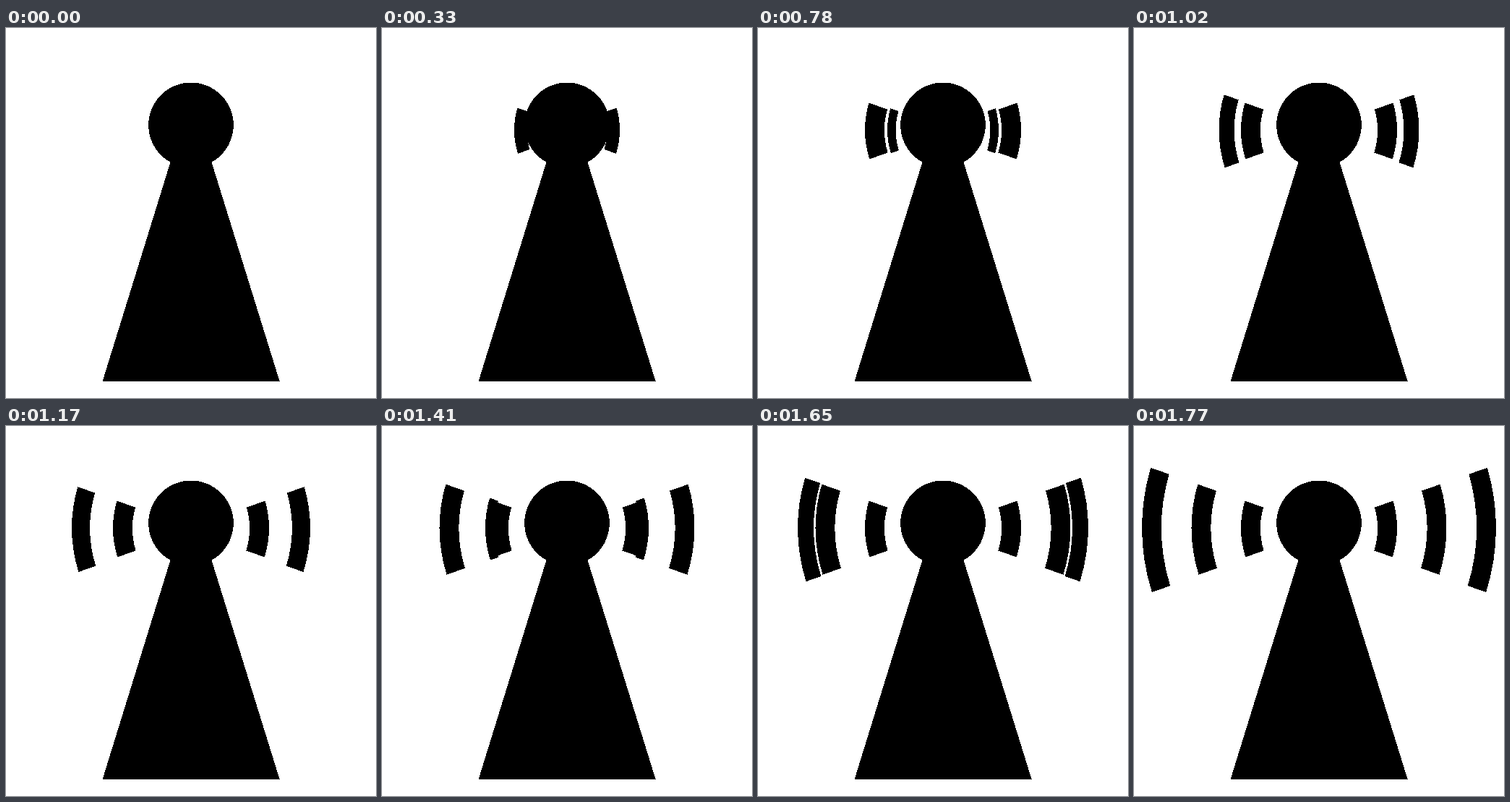
Recreate the animation shown at these times as an HTML page. Size 512 by 512 pixels, loop 2100 ms.

```html
<!DOCTYPE html>
<html lang="en">
<head>
<meta charset="utf-8">
<title>Transmitter</title>
<style>
  html, body { margin: 0; width: 100%; height: 100%; overflow: hidden; background: #fff; }
  svg { display: block; width: 100%; height: 100%; shape-rendering: crispEdges; }
</style>
</head>
<body>
<svg viewBox="0 0 512 512">
  <rect width="512" height="512" fill="#fff"/>
  <path id="left"/>
  <path id="right" transform="matrix(-1 0 0 1 512 0)"/>
  <path d="M228.3 183H283.7L378.7 489H133.5Z"/>
  <circle cx="256" cy="134.3" r="58.8"/>
</svg>
<script>
const LOOP = 2100, STEP = 30;
const FIRST_X = 148, PITCH = 68.5;    // resting place of the bands
const START_HALF = 25, WIDTH = 25.5;  // half height at birth, width at rest
const BULGE = 0.15, SLANT = 0.353, LEAN = 0.01;

const left = document.getElementById('left');
const right = document.getElementById('right');

// Each wave leaves the head from x with a thin band; ease 1 is a full ease-out.
const waves = [
  { start: 180, end: 720, ease: 1, x: 215, width: 8 },
  { start: 720, end: 1260, ease: 0.5, x: 198, width: 8.3 },
  { start: 1260, end: 1770, ease: 0, x: 198, width: 6 }
];

const mix = (a, b, p) => a + (b - a) * p;

// Upright curve from the top corner to the bottom one, or back with dir -1.
function side(x, y, half, dir) {
  const lean = dir * LEAN * half;
  return `${x - lean} ${y - dir * half}` +
    `Q${x - 2 * BULGE * half} ${y} ${x + lean} ${y + dir * half}`;
}

function band(wave, i, time) {
  if (time <= wave.start) return '';
  const t = Math.min(1, (time - wave.start) / (wave.end - wave.start));
  const p = t + wave.ease * t * (1 - t);
  const endX = FIRST_X - PITCH * i;
  const x = mix(wave.x, endX, p);
  const half = mix(START_HALF, 90 - 0.345 * endX, p);
  const width = mix(wave.width, WIDTH, p);
  const y = 144 - x / 100;
  const corner = x + BULGE * half;
  return `M${side(corner, y, half, 1)}` +
    `L${side(corner + width, y, half - SLANT * width, -1)}Z`;
}

function draw(now) {
  const time = Math.floor((now % LOOP) / STEP) * STEP;
  const d = waves.map((w, i) => band(w, i, time)).join('');
  left.setAttribute('d', d);
  right.setAttribute('d', d);
}

let origin = null;
function tick(now) {
  if (origin === null) origin = now;
  draw(now - origin);
  requestAnimationFrame(tick);
}
draw(0);
requestAnimationFrame(tick);
</script>
</body>
</html>
```
